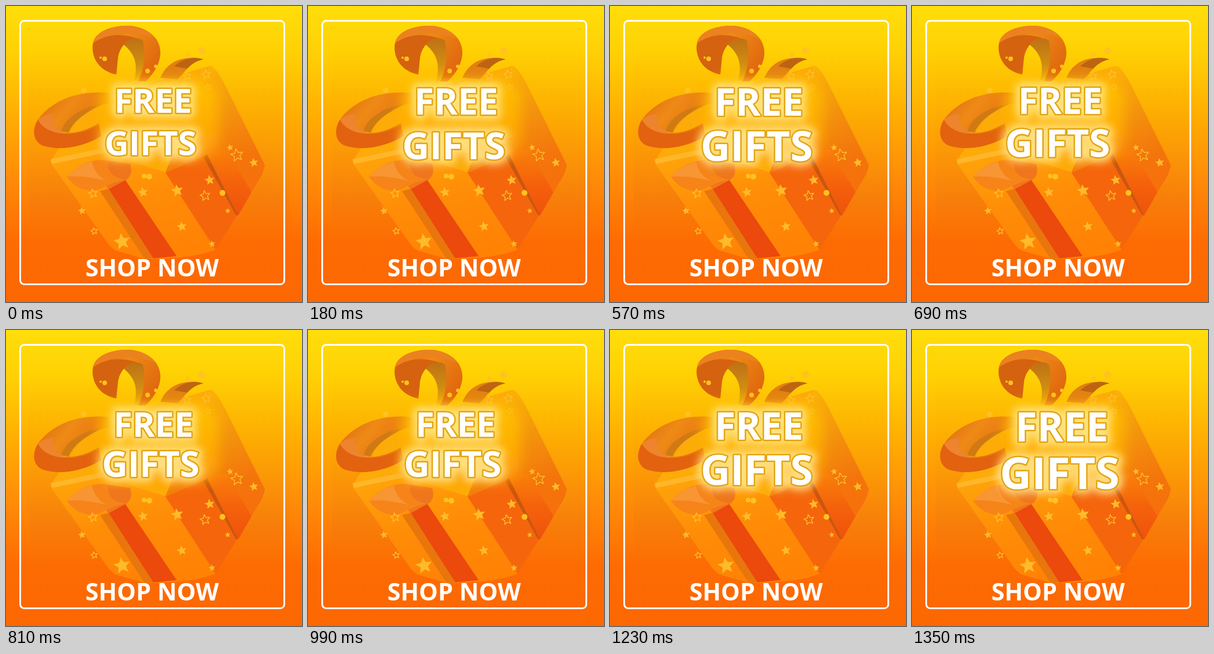
These frames come from a looping animation (510x510 px, 1.85 s). An HTML page:

```html
<!DOCTYPE html>
<html lang="en">
<head>
<meta charset="utf-8">
<title>Free gifts</title>
<style>
html, body { margin: 0; height: 100%; overflow: hidden; }
svg { display: block; width: 510px; height: 510px; }
text { font-family: "Open Sans", "Noto Sans", sans-serif; font-weight: 700; fill: #fff; text-anchor: middle; }
.pulse { stroke: #e3a512; stroke-width: 5; stroke-linejoin: round; paint-order: stroke; }
.halo { fill: #ffec98; stroke: #ffec98; stroke-linejoin: round; }
</style>
</head>
<body>
<svg viewBox="0 0 510 510">
  <defs>
    <linearGradient id="sky" x2="0" y2="1">
      <stop stop-color="#ffde0a"/><stop offset=".16" stop-color="#ffd005"/>
      <stop offset=".36" stop-color="#ffaf02"/><stop offset=".58" stop-color="#ff8c08"/>
      <stop offset=".8" stop-color="#fd6b03"/><stop offset="1" stop-color="#fc6702"/>
    </linearGradient>
    <linearGradient id="shade" x2="0" y2="1">
      <stop stop-color="#ffd400" stop-opacity=".4"/><stop offset=".3" stop-color="#f8a800" stop-opacity=".2"/>
      <stop offset=".75" stop-color="#e87810" stop-opacity=".35"/><stop offset="1" stop-color="#fc6a02" stop-opacity="0"/>
    </linearGradient>
    <linearGradient id="front" x1=".2" y1="0" x2=".6" y2="1">
      <stop stop-color="#ffa50a"/><stop offset=".5" stop-color="#ff8c07"/><stop offset="1" stop-color="#ff8205"/>
    </linearGradient>
    <linearGradient id="side" x1=".3" y1="0" x2=".5" y2="1">
      <stop stop-color="#fdb506"/><stop offset=".28" stop-color="#f3960d"/>
      <stop offset=".56" stop-color="#f4750c"/><stop offset="1" stop-color="#f9680a"/>
    </linearGradient>
    <linearGradient id="band" x2="1" y2=".6">
      <stop stop-color="#d9650f"/><stop offset=".45" stop-color="#ef8a16"/><stop offset="1" stop-color="#e0680e"/>
    </linearGradient>
    <linearGradient id="strap" x2="0" y2="1">
      <stop stop-color="#f9800a"/><stop offset=".5" stop-color="#f5620b"/><stop offset="1" stop-color="#ee520c"/>
    </linearGradient>
    <linearGradient id="inside" x2="0" y2="1">
      <stop stop-color="#bd7014"/><stop offset=".6" stop-color="#d08c12"/><stop offset="1" stop-color="#f0ae08"/>
    </linearGradient>
    <linearGradient id="mist" x2="0" y2="1">
      <stop stop-color="#ffc304"/><stop offset="1" stop-color="#ffa008"/>
    </linearGradient>
    <filter id="soft" x="-40%" y="-40%" width="180%" height="180%"><feGaussianBlur stdDeviation="11"/></filter>
    <filter id="glow" x="-40%" y="-80%" width="180%" height="260%"><feGaussianBlur stdDeviation="7"/></filter>
  </defs>

  <rect width="510" height="510" fill="url(#sky)"/>
  <rect x="41" y="65" width="447" height="365" fill="url(#shade)"/>

  <!-- box -->
  <path d="M76 268 150 160 352 103 275 287Z" fill="#fdab08"/>
  <path d="M352 103Q362 104 381 143L446 274Q444 286 437 298L361 420 274 288Z" fill="url(#side)"/>
  <path d="M274 288 340 259 398 361 361 420Z" fill="#f5660c"/>
  <path d="M77 264 150 248 274 286 361 420Q320 436 240 436L188 421Q178 414 172 404L78 272Z" fill="url(#front)"/>
  <path d="M77 264 160 246 166 254 79 272Z" fill="#ffb62a"/>
  <path d="M346 255 380 247 423 321 400 361Z" fill="url(#strap)"/>
  <path d="M346 255 400 361 396 360 340 260Z" fill="#c9570f"/>
  <path d="M176 316 205 299 294 431 252 435Z" fill="#ec490c"/>
  <path d="M162 319 177 315 254 435 239 436Z" fill="#e8760c"/>

  <!-- bow -->
  <path d="M202 66C214 50 230 50 238 60C246 90 238 112 230 130L221 128C228 100 222 82 202 66Z" fill="url(#inside)"/>
  <path d="M190 118C160 112 146 88 150 64C154 43 184 33 212 34C244 36 267 55 266 82C265 102 252 120 240 130L228 130C238 108 241 84 236 60C221 48 198 62 193 88Z" fill="url(#band)"/>
  <path d="M236 60C221 48 198 62 193 88L190 118C160 112 146 88 150 64C166 48 205 45 236 60Z" fill="#d5620f"/>
  <path d="M150 64C154 43 184 33 212 34C232 35 248 44 257 56C225 42 175 46 150 64Z" fill="#ec8120"/>
  <path d="M266 124C276 98 302 83 340 92C318 96 312 110 296 126Z" fill="#e28012"/>
  <path d="M290 104C304 90 324 86 340 92C326 95 319 101 312 108Z" fill="#bd6412"/>
  <path d="M178 150C120 144 76 166 55 196C45 212 46 232 62 240C90 250 132 244 164 224L160 202C140 214 116 222 96 217C98 198 126 174 178 168Z" fill="url(#band)"/>
  <path d="M55 196C45 212 46 232 62 240C90 250 132 244 164 224L160 205C130 226 78 226 55 196Z" fill="#e2620f"/>
  <path d="M55 196C68 220 100 222 118 219C106 220 97 219 96 215C84 212 78 202 82 186C72 186 62 190 55 196Z" fill="#ee842e"/>
  <path d="M96 216C98 198 126 174 170 168C138 182 116 198 108 218Z" fill="#d07a14"/>
  <path d="M172 266 214 272Q220 292 206 300L176 316Q164 296 172 266Z" fill="#ef761c"/>
  <path d="M105 294C122 276 146 262 176 266C174 284 182 296 206 299C190 302 176 308 160 316C140 322 118 314 105 294Z" fill="#f68419"/>
  <path d="M105 294C122 276 136 272 148 268C152 286 162 296 174 301C148 296 128 292 105 294Z" fill="#f79632"/>

  <g id="stars" stroke-linejoin="round"></g>

  <rect x="160" y="129" width="206" height="132" rx="34" fill="url(#mist)" opacity=".95" filter="url(#soft)"/>
  <g id="title"></g>

  <text x="251.700" y="466" font-size="41.300">SHOP NOW</text>
  <rect x="24.500" y="25.500" width="455" height="454" rx="7" fill="none" stroke="#fff" stroke-width="3"/>
</svg>
<script>
const NS = "http://www.w3.org/2000/svg";
const byId = id => document.getElementById(id);
function add(parent, tag, attrs) {
  const node = document.createElementNS(NS, tag);
  for (const key in attrs) node.setAttribute(key, attrs[key]);
  return parent.appendChild(node);
}

function star(x, y, r, outlined) {
  const points = Array.from({ length: 10 }, (_, i) => {
    const a = i * Math.PI / 5 - 1.75, d = i % 2 ? r * 0.45 : r;
    return (x + d * Math.cos(a)).toFixed(1) + "," + (y + d * Math.sin(a)).toFixed(1);
  });
  add(byId("stars"), "polygon", {
    points: points.join(" "), fill: outlined ? "none" : "#ffbb2b",
    stroke: outlined ? "#ffc233" : "none", "stroke-width": 1.3
  });
}
[[236, 321, 9], [200, 406, 15], [303, 380, 9], [351, 300, 9], [427, 270, 8], [382, 353, 5], [386, 244, 6], [295, 318, 11], [131, 353, 7], [355, 410, 6]]
  .forEach(s => star(...s));
[[150, 323, 8], [398, 257, 11], [343, 327, 9], [345, 118, 8], [152, 388, 6], [312, 121, 7], [348, 140, 6]]
  .forEach(s => star(...s, true));
[[170, 91, 4], [163, 89, 2], [218, 115, 2], [244, 112, 4], [258, 104, 3], [337, 77, 6], [313, 84, 4], [134, 145, 5], [247, 294, 5], [238, 293, 4], [373, 322, 5]]
  .forEach(([cx, cy, r]) => add(byId("stars"), "circle", { cx, cy, r, fill: "#ffc21f" }));

// One [x, baseline, size] per key pose: opening, large, small.
const words = [
  { label: "FREE", poses: [[253.5, 184, 57.5], [258, 192, 69], [253, 181.5, 56.5]] },
  { label: "GIFTS", poses: [[249, 256.5, 58], [254.5, 274, 75.5], [248, 248, 58]] }
];
const title = byId("title");
const halos = add(title, "g", { filter: "url(#glow)", opacity: 0.8 });
for (const word of words) {
  word.nodes = [
    add(halos, "text", { class: "halo", "stroke-width": 18 }),
    add(title, "text", { class: "pulse" })
  ];
  word.nodes.forEach(node => node.textContent = word.label);
}

// Opening -> large -> small -> large, 15 steps each, then a hold.
const LOOP = 1850, STEP = 30, TWEEN = 15, ORDER = [0, 1, 2, 1];

function draw(now) {
  const step = Math.min(3 * TWEEN, Math.floor(now % LOOP / STEP));
  const leg = Math.min(2, Math.floor(step / TWEEN));
  const t = step / TWEEN - leg;
  for (const { nodes, poses } of words) {
    const from = poses[ORDER[leg]], to = poses[ORDER[leg + 1]];
    const [x, y, size] = from.map((v, i) => v + (to[i] - v) * t);
    for (const node of nodes) {
      node.setAttribute("x", x);
      node.setAttribute("y", y);
      node.setAttribute("font-size", size);
    }
  }
}
const start = performance.now();
function tick() {
  draw(performance.now() - start);
  requestAnimationFrame(tick);
}
tick();
</script>
</body>
</html>
```
